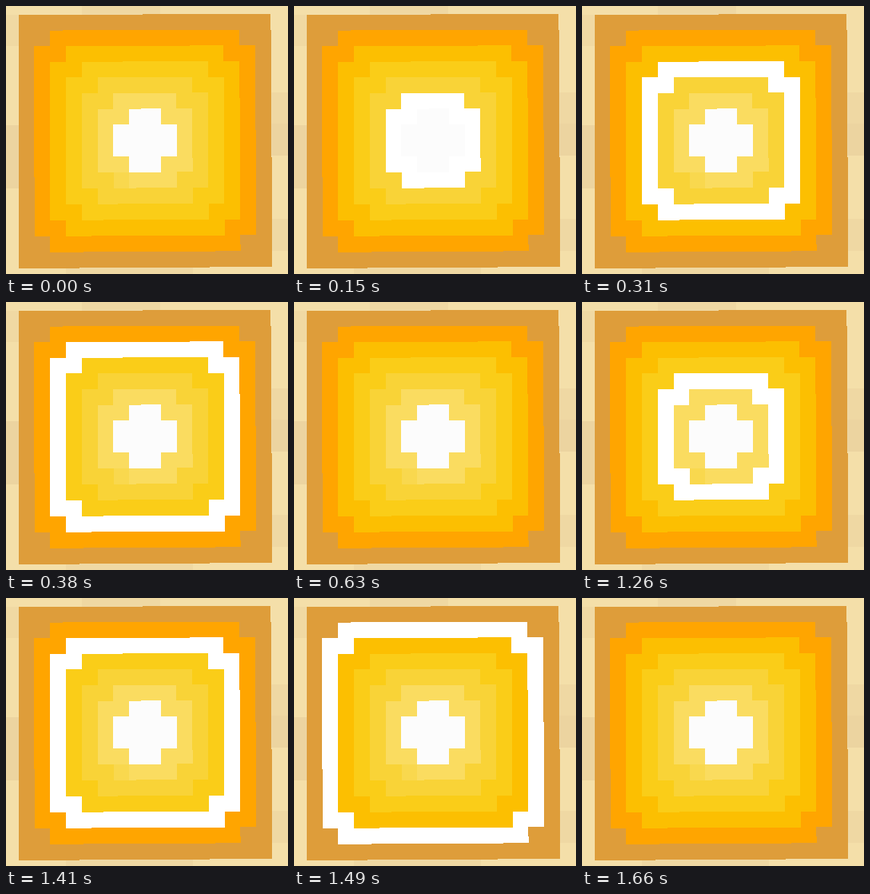
Animation, 353 px wide and 335 px high, one loop 1.74 s. Source, as an HTML page:

```html
<!DOCTYPE html>
<html lang="en">
<head>
<meta charset="utf-8">
<title>Pulsing target block</title>
<style>
  html, body { margin: 0; width: 100%; height: 100%; overflow: hidden; background: #f4dfa9; }
  svg { display: block; width: 353px; height: 335px; }
</style>
</head>
<body>
<svg id="stage" viewBox="0 0 353 335" shape-rendering="crispEdges"></svg>
<script>
const LOOP = 1740;
const RING_COLORS = ['#fcfcfc', '#fadc60', '#f9d337', '#facd18', '#fcbf01', '#ffa500'];
const NOTCH_COLOR = '#f9d84e';
const FLASH = '#ffffff';

// [start in ms, ring that is lit (0 = none)]
const STEPS = [
  [0, 0], [150, 1], [230, 2], [310, 3], [380, 4], [550, 5], [630, 0],
  [1090, 1], [1260, 2], [1340, 3], [1410, 4], [1490, 5], [1660, 0]
];

const stage = document.getElementById('stage');

// Maps the 16 x 16 block grid to the slightly skewed face on screen.
function project([u, v]) {
  const x = 15.7 + u * (19.73 + 0.0078 * v);
  const y = 10.5 + 19.594 * v + 0.0117 * v * v + (8 - u) * (0.075 + 0.003 * v);
  return x.toFixed(2) + ',' + y.toFixed(2);
}

function addPolygon(points, color) {
  const shape = document.createElementNS('http://www.w3.org/2000/svg', 'polygon');
  shape.setAttribute('points', points.map(project).join(' '));
  shape.setAttribute('fill', color);
  return stage.appendChild(shape);
}

function addCells(u, v, w, h, color) {
  return addPolygon([[u, v], [u + w, v], [u + w, v + h], [u, v + h]], color);
}

// A square with one cell cut from each corner.
function addRing(index) {
  const a = index + 2, b = a - 1;
  const points = [
    [-b, -a], [b, -a], [b, -b], [a, -b], [a, b], [b, b],
    [b, a], [-b, a], [-b, b], [-a, b], [-a, -b], [-b, -b]
  ].map(([x, y]) => [8 + x, 8 + y]);
  return addPolygon(points, RING_COLORS[index]);
}

// Sand around the block
addCells(-1, 2, 1, -2, '#f0d9a3');
addCells(-1, 7, 1, 4, '#ecd4a0');
addCells(3, 16, 8, 1, '#efd8a3');
addCells(4, -1, 5, 1, '#efd8a3');
addCells(16, 5, 2, 2, '#efd8a3');
addCells(16, 7, 2, 2, '#ecd4a0');
addCells(16, 13, 2, 2, '#efd8a3');

addCells(0, 0, 16, 16, '#de9d3a');
const rings = [];
let notch;
for (let i = 5; i >= 0; i--) {
  rings[i] = addRing(i);
  if (i === 1) notch = addCells(6, 10, 1, 1, NOTCH_COLOR);
}

function draw(now) {
  const t = now % LOOP;
  const lit = STEPS.filter(([start]) => start <= t).pop()[1];
  for (let i = 1; i < rings.length; i++) {
    rings[i].setAttribute('fill', i === lit ? FLASH : RING_COLORS[i]);
  }
  notch.setAttribute('fill', lit === 1 ? FLASH : NOTCH_COLOR);
}

const startTime = performance.now();
function tick() {
  draw(performance.now() - startTime);
  requestAnimationFrame(tick);
}
tick();
</script>
</body>
</html>
```
